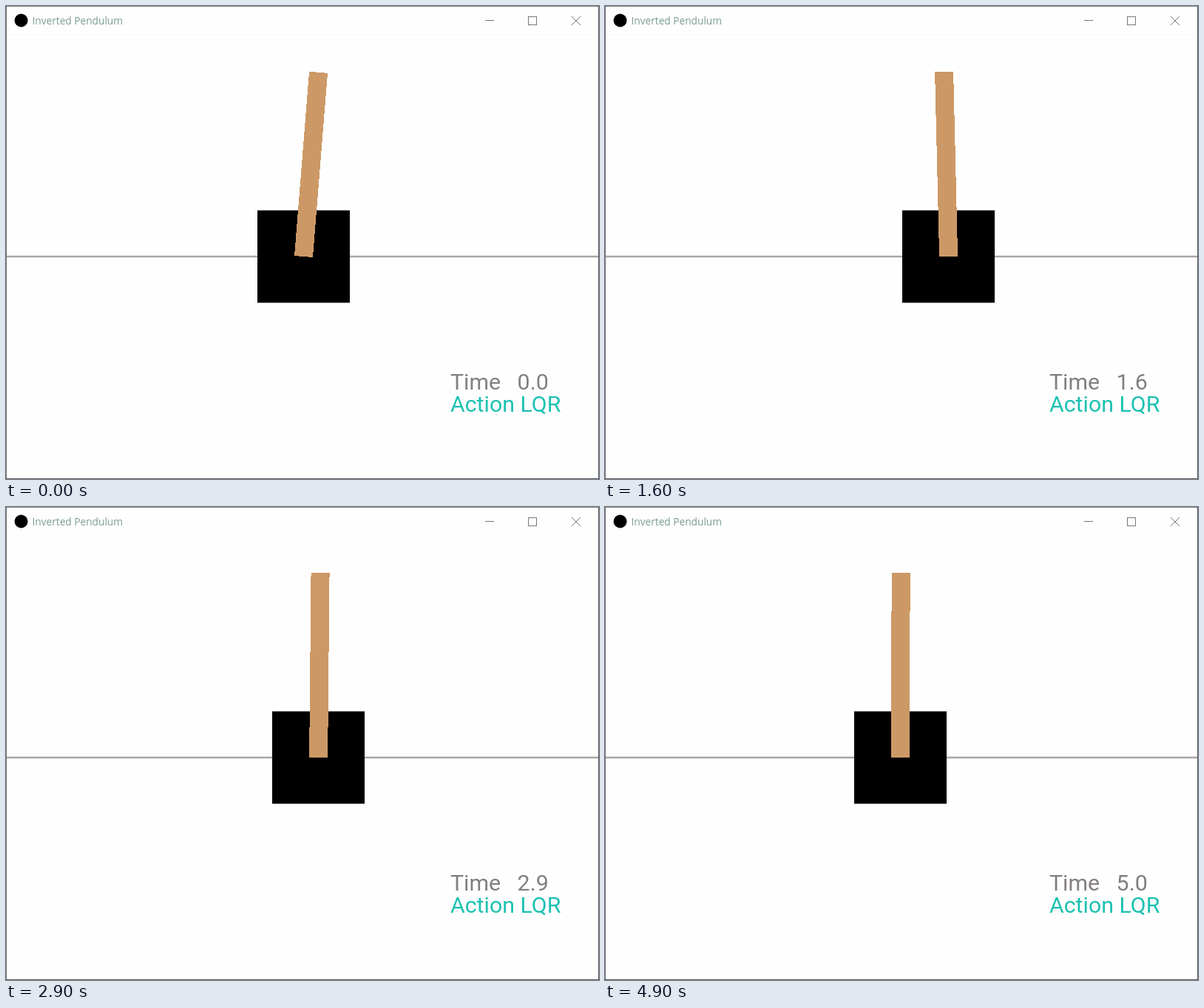
Recreate the animation shown at these times as an HTML page with a canvas. Size 802 by 640 pixels, loop 5 s.

```html
<!DOCTYPE html>
<html lang="en">
<head>
<meta charset="utf-8">
<title>Inverted Pendulum</title>
<style>
  html, body { margin: 0; width: 100%; height: 100%; overflow: hidden; background: #fefefe; }
  canvas { display: block; }
</style>
</head>
<body>
<canvas id="stage" width="802" height="640"></canvas>
<script>
const ctx = document.getElementById('stage').getContext('2d');
const LOOP = 5000, STEP = 100, TICK = 0.1012;
const START_X = 402.5, RAIL_Y = 339, CART = 125, POLE_W = 25, POLE_L = 250;

// cart centre: swings out to the right, then settles with a slight overshoot
const cartX = t => START_X + 266.5 * t ** 1.75 * (1 - t / 4.15) * Math.exp(-1.12 * t);

// sideways lean of the pole tip: damped swing, upright at 0.415 s and 2.2 s
const tipLean = t =>
  20 * (1 - t / 0.415) * (1 - t / 2.2) * Math.sqrt(1 + 15 * t) * Math.exp(-1.6 * t);

function box(color, x, y, w, h) {
  ctx.fillStyle = color;
  ctx.fillRect(x, y, w, h);
}

function text(str, x, y, font, color) {
  ctx.font = font;
  ctx.fillStyle = color;
  ctx.fillText(str, x, y);
}

// fill a convex polygon row by row with hard pixel edges
function fillHard(points, color) {
  const ys = points.map(p => p[1]);
  for (let y = Math.floor(Math.min(...ys)); y < Math.max(...ys); y++) {
    const mid = y + 0.5, xs = [];
    points.forEach((p, i) => {
      const q = points[(i + 1) % points.length];
      if ((p[1] <= mid) !== (q[1] <= mid)) {
        xs.push(p[0] + (q[0] - p[0]) * (mid - p[1]) / (q[1] - p[1]));
      }
    });
    if (xs.length < 2) continue;
    const left = Math.round(Math.min(...xs)), right = Math.round(Math.max(...xs));
    box(color, left, y, right - left, 1);
  }
}

function drawWindow() {
  box('#fefefe', 0, 0, 802, 640);
  box('#f7f7f7', 1, 39, 800, 1);
  box('#858585', 0, 0, 802, 1);
  box('#757272', 0, 0, 1, 640);
  box('#5c5858', 801, 0, 1, 640);
  box('#5c5858', 0, 639, 802, 1);

  ctx.fillStyle = '#000';
  ctx.beginPath();
  ctx.arc(20.5, 19.5, 9, 0, Math.PI * 2);
  ctx.fill();
  text('Inverted Pendulum', 35.5, 25, '13.7px "Open Sans", sans-serif', '#7a9c96');

  box('#777', 648, 19, 12, 1);
  ctx.strokeStyle = '#777';
  ctx.lineWidth = 1;
  ctx.strokeRect(706.5, 14.5, 11, 11);
  ctx.beginPath();
  ctx.moveTo(765, 14);
  ctx.lineTo(777, 26);
  ctx.moveTo(777, 14);
  ctx.lineTo(765, 26);
  ctx.stroke();
}

function drawPendulum(cx, lean) {
  box('#a9a5a5', 1, RAIL_Y - 1.25, 800, 2.5);
  box('#000', Math.round(cx - CART / 2), RAIL_Y - CART / 2, CART, CART);

  const sin = lean / POLE_L, cos = Math.sqrt(1 - sin * sin), r = POLE_W / 2;
  const at = (u, v) => [cx + u * cos + v * sin, RAIL_Y + u * sin - v * cos];
  fillHard([at(-r, 0), at(r, 0), at(r, POLE_L), at(-r, POLE_L)], '#cc9966');
}

function render(ms) {
  const n = Math.floor((ms % LOOP) / STEP), t = n * STEP / 1000;
  const font = '30.3px Roboto, sans-serif';
  drawWindow();
  drawPendulum(cartX(t), tipLean(t));
  text('Time   ' + (n * TICK).toFixed(1), 601, 519, font, '#837f7e');
  text('Action LQR', 601, 549, font, '#1bc1b1');
}

function loop() {
  render(performance.now());
  requestAnimationFrame(loop);
}
loop();
</script>
</body>
</html>
```
